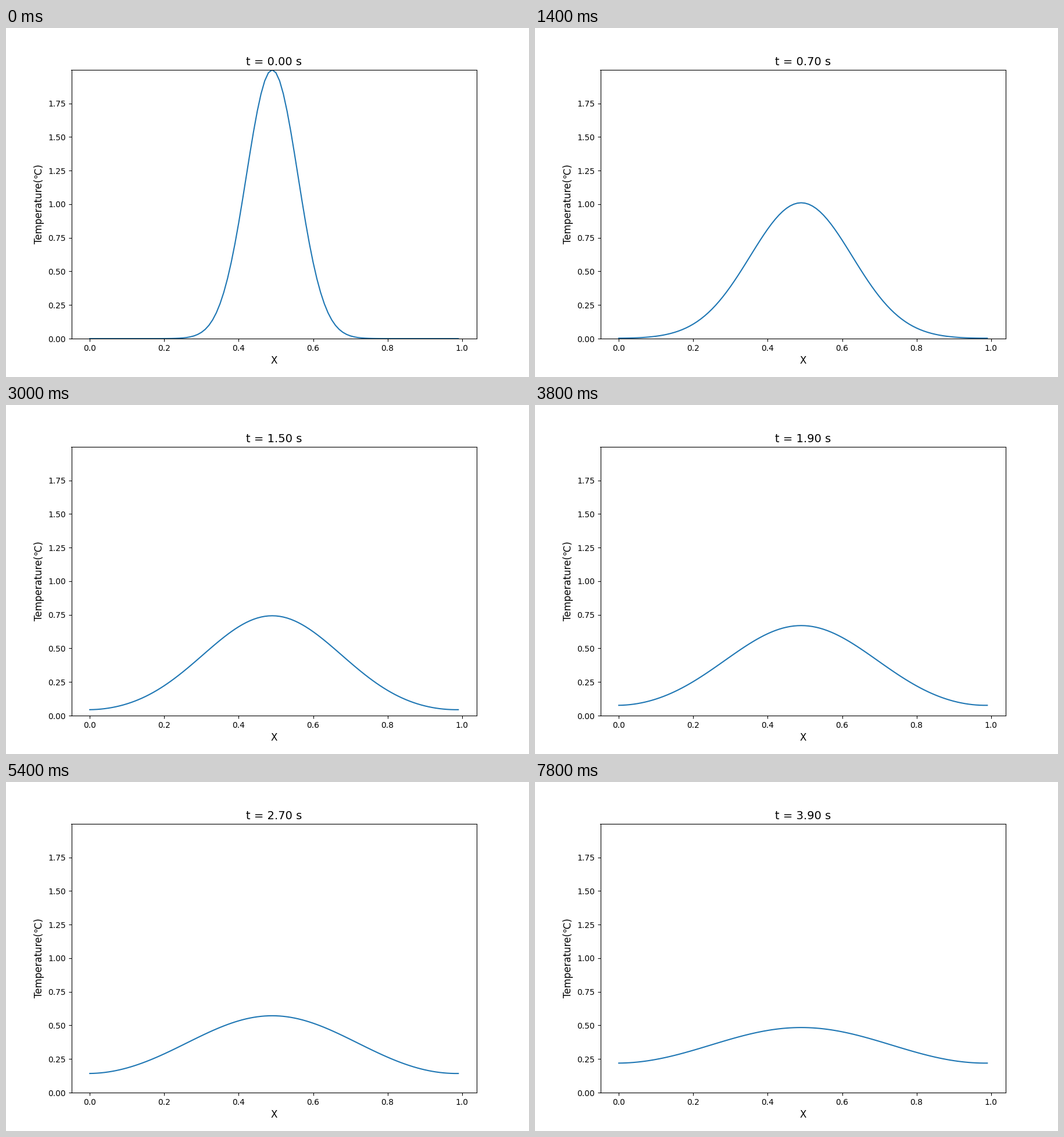
Write a matplotlib script that moves like this. It is 900 px wide and 600 px high and loops after 8 s.

```python
import numpy as np
import matplotlib.pyplot as plt
from matplotlib.animation import FuncAnimation

plt.rcParams["font.family"] = "DejaVu Sans"

FRAMES = 40
INTERVAL = 200        # ms
DT = 0.1              # simulated seconds per frame
DIFFUSIVITY = 0.01
PERIOD = 0.99
CENTRE = 0.49
PEAK = 1.999
WIDTH2 = 0.00961      # squared width of the starting bell

x = np.arange(100) * 0.01


def temperature(t):
    """Spreading Gaussian on a periodic rod, summed over its images."""
    w2 = WIDTH2 + 4 * DIFFUSIVITY * t
    images = CENTRE + PERIOD * np.arange(-3, 4)
    bells = np.exp(-(x[:, None] - images) ** 2 / w2)
    return PEAK * np.sqrt(WIDTH2 / w2) * bells.sum(axis=1)


fig, ax = plt.subplots(figsize=(9, 6), dpi=100)
line, = ax.plot(x, temperature(0), color="#1f77b4", lw=1.5)
ax.set_ylim(0, PEAK)
ax.set_xlabel("X", fontsize=12)
ax.set_ylabel("Temperature(℃)", fontsize=12)
title = ax.set_title("t = 0.00 s", fontsize=14)


def update(n):
    t = n * DT
    line.set_ydata(temperature(t))
    title.set_text(f"t = {t:.2f} s")
    return line, title


anim = FuncAnimation(fig, update, frames=FRAMES, interval=INTERVAL,
                     repeat=True, repeat_delay=0, blit=False)
plt.show()
```
